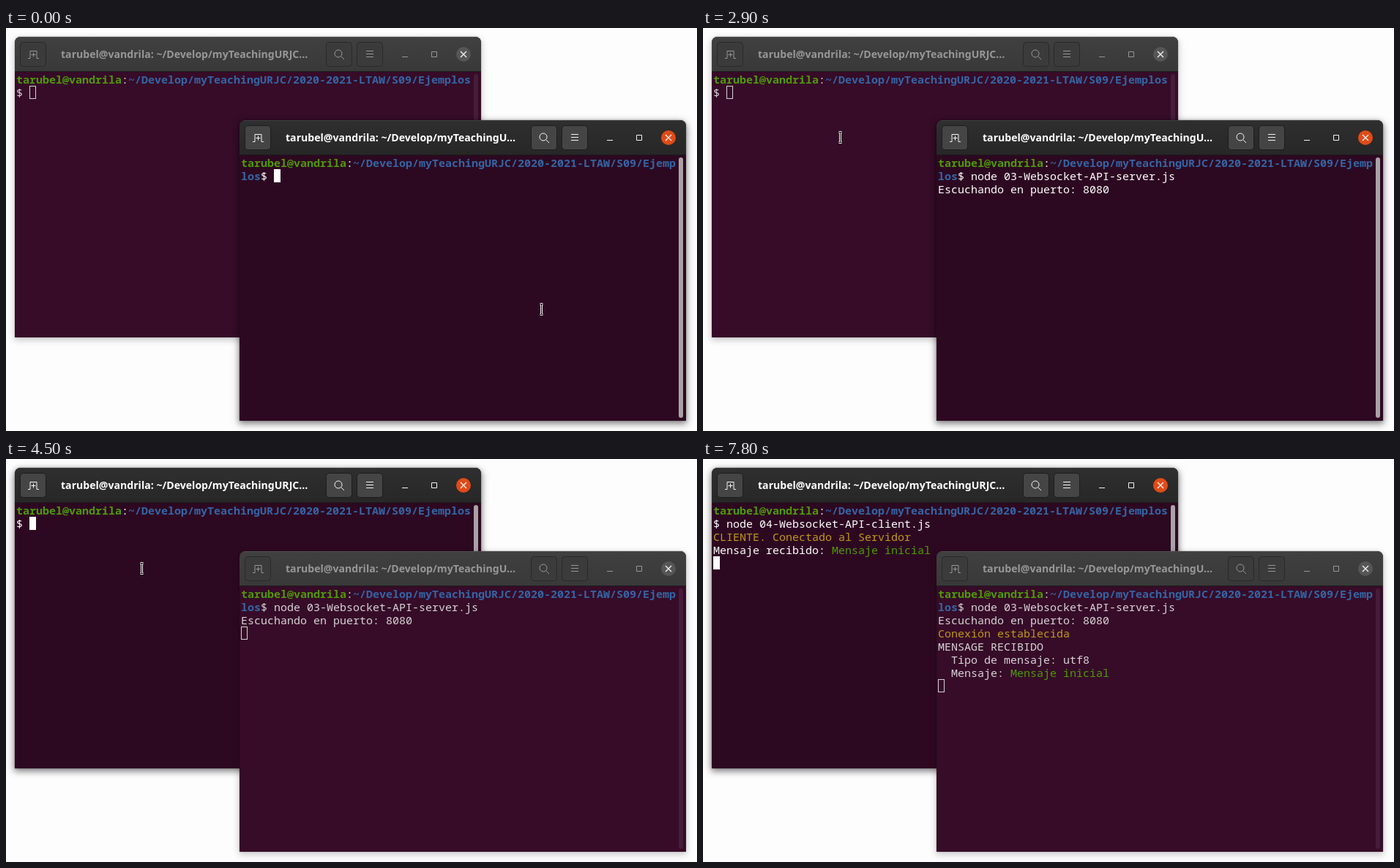
Animation of 944x551 px, one loop 8 s. Source, as an HTML page:

```html
<!DOCTYPE html>
<html lang="es">
<head>
<meta charset="utf-8">
<title>Terminales</title>
<style>
  html, body { margin: 0; width: 100%; height: 100%; overflow: hidden; background: #fefdfe; }
  .win {
    --f: 0;
    --p: calc(var(--f) * 100%);
    --top: color-mix(in srgb, #2f2f2f var(--p), #404040);
    --low: color-mix(in srgb, #272727 var(--p), #393939);
    --btn: color-mix(in srgb, #454545 var(--p), #3b3b3b);
    --edge: color-mix(in srgb, #1d1d1d var(--p), #292929);
    --icon: color-mix(in srgb, #f4f4f4 var(--p), #979797);
    --title: color-mix(in srgb, #ffffff var(--p), #979797);
    --close: color-mix(in srgb, #e04b18 var(--p), #565656);
    position: absolute; height: 411px; overflow: hidden;
    border-radius: 8px 8px 0 0;
    background: #360c28;
    box-shadow: 0 3px 10px 1px rgba(0, 0, 0, calc(.2 + .3 * var(--f))), 0 0 2px rgba(0, 0, 0, .35);
  }
  .win.on { background: #2d0921; }
  .head {
    position: absolute; inset: 0 0 auto; height: 47px;
    background: linear-gradient(var(--top), var(--low));
    border-bottom: 1px solid #1b1b1b;
    box-shadow: inset 0 1px rgba(255, 255, 255, .07);
  }
  svg { position: absolute; left: 0; top: 0; display: block; }
  text { white-space: pre; font: 15px "Noto Sans Mono", "DejaVu Sans Mono", monospace; fill: #d8d2d6; }
  .on text { fill: #fff; }
  text.title { font: bold 14.1px "Noto Sans", "Open Sans", sans-serif; fill: var(--title); }
  text.user { font-weight: bold; fill: #4e9a06; }
  text.path { font-weight: bold; fill: #3465a4; }
  text.green { fill: #4e9a06; }
  text.gold { fill: #bf981a; }
  .btn { fill: var(--btn); stroke: var(--edge); }
  .icon { fill: none; stroke: var(--icon); }
  .close { fill: var(--close); }
  .cross { fill: none; stroke: #f5f5f5; stroke-width: 1.3; }
  .bar { fill: #451d38; }
  .on .bar { fill: #aaa2a8; }
  .cursor { fill: #d8d2d6; stroke: #d8d2d6; }
  .on .cursor { fill: #fff; stroke: #fff; }
  .win .cursor.hollow { fill: none; }
  #mouse path { fill: none; stroke: #fff; stroke-width: 3; }
  #mouse path + path { stroke: #000; stroke-width: 1; }
</style>
</head>
<body>
<script>
const LOOP = 8000, STEP = 100, CELL = 9, LINE = 18;
const USER = 'tarubel@vandrila';
const DIR = '~/Develop/myTeachingURJC/2020-2021-LTAW/S09/Ejemp';

// Text items: column, row, string, class, first and last moment
const left = {
  x: 12, y: 12, w: 637, title: USER + ': ~/Develop/myTeachingURJC…',
  items: [
    [0, 0, USER, 'user'], [16, 0, ':'], [17, 0, DIR + 'los', 'path'],
    [0, 1, '$'],
    [2, 1, 'clear', '', 5900, 6500],
    [2, 1, 'node 04-Websocket-API-client.js', '', 6500],
    [0, 2, 'CLIENTE. Conectado al Servidor', 'gold', 7800],
    [0, 3, 'Mensaje recibido:', '', 7800], [18, 3, 'Mensaje inicial', 'green', 7800]
  ],
  // Cursor: moment, column, row, hollow; no column means hidden
  cursor: [
    [0, 2, 1, true], [3800, 2, 1], [4800], [5200, 2, 1], [5800], [5900, 7, 1],
    [6500, 34, 1], [6800], [7500, 34, 1], [7600, 0, 2], [7800, 0, 4]
  ]
};
const right = {
  x: 319, y: 126, w: 610, title: USER + ': ~/Develop/myTeachingU…',
  items: [
    [0, 0, USER, 'user'], [16, 0, ':'], [17, 0, DIR, 'path'],
    [0, 1, 'los', 'path'], [3, 1, '$'],
    [5, 1, 'clear', '', 500, 700],
    [5, 1, 'node 03-Websocket-API-server.js', '', 700],
    [0, 2, 'Escuchando en puerto: 8080', '', 1400],
    [0, 3, 'Conexión establecida', 'gold', 7800],
    [0, 4, 'MENSAGE RECIBIDO', '', 7800],
    [2, 5, 'Tipo de mensaje: utf8', '', 7800],
    [2, 6, 'Mensaje:', '', 7800], [11, 6, 'Mensaje inicial', 'green', 7800]
  ],
  cursor: [
    [0, 5, 1], [200], [500, 10, 1], [700, 37, 1], [1100, 0, 2], [1400, 0, 3],
    [2000], [2300, 0, 3], [2900], [3800, 0, 3, true], [7800, 0, 7, true]
  ]
};
const pointer = [
  [0, 731.5, 384.5], [500], [1700, 402.5, 267.5], [1800, 342.5, 262.5],
  [1900, 258.5, 249.5], [2000, 217.5, 240.5], [2300, 200.5, 188.5],
  [2400, 192.5, 161.5], [2600, 187.5, 149.5], [3100, 186.5, 149.5],
  [4500, 185.5, 149.5], [6000]
];

const at = (x, d, cls = 'icon') => `<path class="${cls}" transform="translate(${x} 24)" d="${d}"/>`;
const button = x => `<rect class="btn" x="${x - 17.5}" y="7.5" width="35" height="33" rx="4"/>`;

function chrome(w, title) {
  const search = w - 194, menu = w - 152;
  return button(25) + button(search) + button(menu) +
    at(25.5, 'M-7.5 5.5h3v-10h9v10h3M0 -2.5v6M-3 .5h6') +
    at(search, 'M4 -1a5 5 0 1 1 -10 0a5 5 0 1 1 10 0M2.7 2.7L7 7') +
    at(menu, 'M-5 -4.5h10M-5 -.5h10M-5 3.5h10') +
    at(w - 104, 'M-4 3.5h8') +
    at(w - 64, 'M-3.5 -3.5h7v7h-7z') +
    `<circle class="close" cx="${w - 24}" cy="24" r="10"/>` +
    at(w - 24, 'M-4 -4l8 8M4 -4l-8 8', 'cross') +
    `<text class="title" x="63" y="29">${title}</text>` +
    `<rect class="bar" x="${w - 10}" y="51" width="6" height="356" rx="3"/>`;
}

function build(win) {
  const el = document.createElement('div');
  el.className = 'win';
  el.style.cssText = `left:${win.x}px;top:${win.y}px;width:${win.w}px`;
  const lines = win.items.map(([col, row, str, cls = '']) =>
    `<text class="line ${cls}" x="${2 + col * CELL}" y="${64 + row * LINE}">${str}</text>`).join('');
  el.innerHTML = `<div class="head"></div><svg width="${win.w}" height="411">` +
    chrome(win.w, win.title) + lines +
    '<rect class="cursor" width="8" height="17"/></svg>';
  document.body.append(el);
  win.el = el;
  win.lines = [...el.querySelectorAll('.line')];
  win.block = el.querySelector('.cursor');
}

build(left);
build(right);
document.body.insertAdjacentHTML('beforeend', `<svg width="944" height="551"><g id="mouse">
  ${'<path d="M-2 -7h4M0 -7v14M-2 7h4"/>'.repeat(2)}</g></svg>`);
const mouse = document.getElementById('mouse');

const current = (list, t) => list.findLast(e => e[0] <= t);
const clamp = v => Math.max(0, Math.min(1, v));
const show = (el, yes) => { el.style.display = yes ? '' : 'none'; };

function paint(win, t, focus, active) {
  win.el.style.setProperty('--f', focus);
  win.el.classList.toggle('on', active);
  win.items.forEach(([, , , , from = 0, to = LOOP], i) => show(win.lines[i], t >= from && t < to));
  const [, col, row, hollow] = current(win.cursor, t);
  show(win.block, col !== undefined);
  if (col === undefined) return;
  win.block.setAttribute('x', 2.5 + col * CELL);
  win.block.setAttribute('y', 49.5 + row * LINE);
  win.block.classList.toggle('hollow', !!hollow);
}

function frame() {
  const t = Math.floor(performance.now() % LOOP / STEP) * STEP;
  const swapped = t >= 4000;
  paint(left, t, clamp((t - 3900) / 120), swapped);
  paint(right, t, clamp(1 - (t - 3900) / 500), !swapped);
  const [, x, y] = current(pointer, t);
  show(mouse, x !== undefined);
  if (x !== undefined) mouse.setAttribute('transform', `translate(${x} ${y})`);
  requestAnimationFrame(frame);
}
frame();
</script>
</body>
</html>
```
